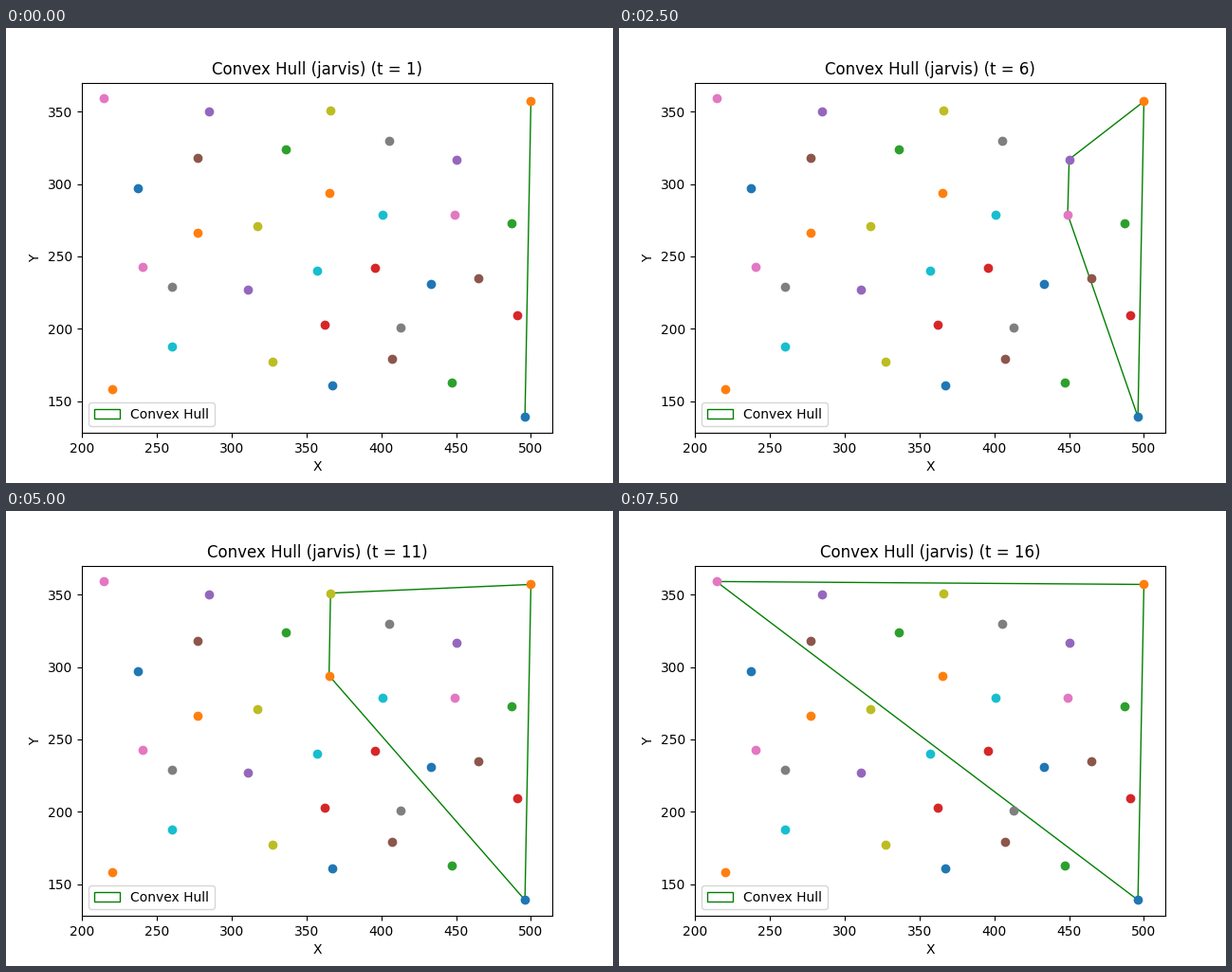
Recreate the animation shown at these times as a matplotlib script. Size 640 by 480 pixels, loop 8000 ms.

```python
import math

import matplotlib.pyplot as plt
from matplotlib.animation import FuncAnimation
from matplotlib.patches import Polygon

STEPS = 16
INTERVAL = 500

# Corners that the sweep visits; the lowest one is its pivot.
CORNERS = [
    (496, 139), (500, 357), (487, 273), (491, 209), (450, 317), (465, 235),
    (449, 279), (405, 330), (366, 351), (401, 279), (433, 231), (365, 294),
    (336, 324), (396, 242), (285, 350), (277, 318), (214, 359),
]


def zigzag(n, x, y, dx, dy, zig):
    """Evenly spaced dots along a line, every second one shifted by zig."""
    return [(x + k * dx, y + k * dy + k % 2 * zig) for k in range(n)]


def cross(o, a, b):
    return (a[0] - o[0]) * (b[1] - o[1]) - (a[1] - o[1]) * (b[0] - o[0])


def sweep(points):
    """Sort points by angle around the lowest one, which comes first."""
    px, py = pivot = min(points, key=lambda p: p[1])
    rest = [p for p in points if p != pivot]
    rest.sort(key=lambda p: math.atan2(p[1] - py, p[0] - px))
    return [pivot] + rest


def scan_hulls(points):
    """Return the hull after each swept point has been added."""
    stack, hulls = points[:1], []
    for p in points[1:]:
        while len(stack) > 1 and cross(stack[-2], stack[-1], p) <= 0:
            stack.pop()
        stack.append(p)
        hulls.append(list(stack))
    return hulls


points = sweep(CORNERS
               + zigzag(4, 237, 297, 40, -13, -18)
               + zigzag(4, 260, 229, 51, -13, 11)
               + zigzag(3, 220, 158, 20, 15, 70)
               + zigzag(4, 327, 177, 40, 1, -17))
hulls = scan_hulls(points)

fig, ax = plt.subplots(figsize=(6.4, 4.8), dpi=100)
for x, y in points:
    ax.plot(x, y, "o")
hull = ax.add_patch(Polygon(hulls[0], closed=True, fill=False,
                            edgecolor="green", label="Convex Hull"))
ax.set_xlabel("X")
ax.set_ylabel("Y")
ax.legend(loc="lower left")


def draw(i):
    hull.set_xy(hulls[i])
    title = ax.set_title(f"Convex Hull (jarvis) (t = {i + 1})")
    return hull, title


anim = FuncAnimation(fig, draw, frames=STEPS, init_func=lambda: draw(0),
                     interval=INTERVAL, repeat=True)
plt.show()
```
